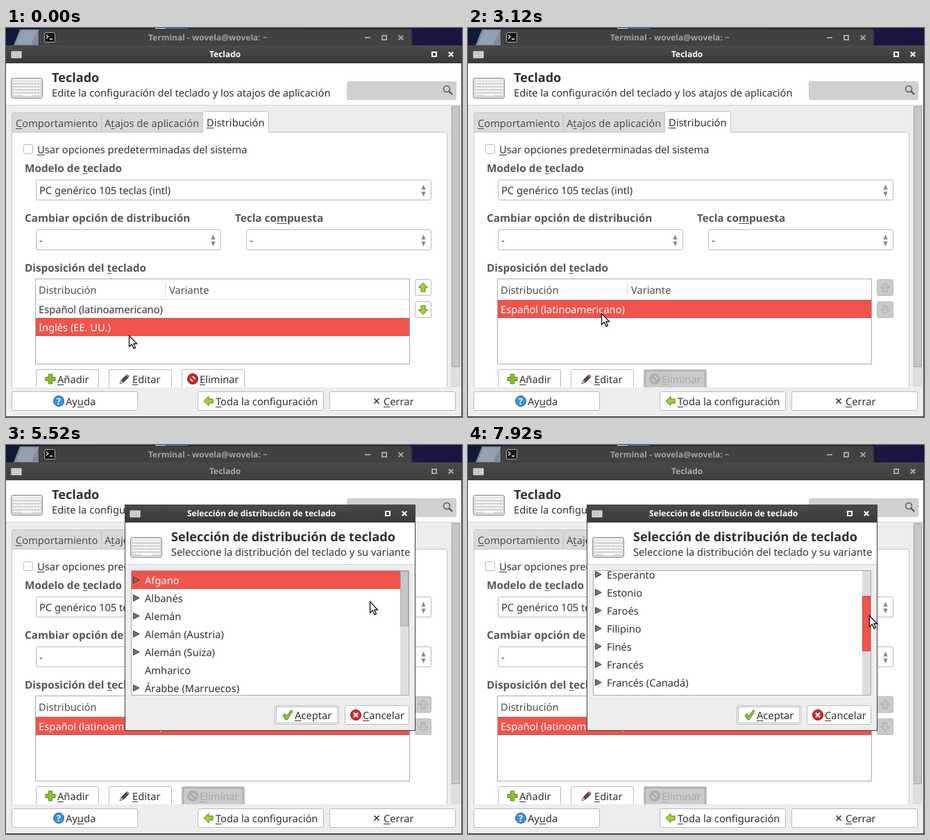
Animation, 657 px wide and 562 px high, one loop 8 s. Source, as an HTML page with a canvas:

```html
<!DOCTYPE html>
<html lang="es">
<head>
<meta charset="utf-8">
<style>
html, body { margin: 0; width: 100%; height: 100%; overflow: hidden; }
canvas { display: block; }
</style>
</head>
<body>
<canvas id="stage" width="657" height="562"></canvas>
<script>
const ctx = document.getElementById('stage').getContext('2d');
const LOOP = 8000, STEP = 120;
const INK = '#2f2f2f', SOFT = '#565656', RED = '#f0544c', BODY = '#ededed', EDGE = '#b9b9b9', OFF = '#a8a8a8';
const face = '"Noto Sans", "Open Sans", sans-serif';
const REG = '14.67px ' + face, LABEL = 'bold 15.3px ' + face;
const HEAD = 'bold 18.1px ' + face, TITLE = 'bold 12px ' + face;

// time, pointer x, pointer y, list scroll
const keys = [
  [0, 177, 444, 0], [840, 280, 505, 0], [1200, 280, 505, 0], [1800, 192, 412, 0],
  [3120, 192, 412, 0], [3240, 174, 400, 0], [3360, 147, 420, 0], [3480, 125, 446, 0],
  [3600, 125, 446, 0], [4200, 99, 506, 0], [4800, 99, 506, 0], [5160, 512, 231, 0],
  [5280, 512, 231, 0], [6120, 573, 207, 0], [6240, 573, 207, 0], [6480, 575, 211, 0],
  [6960, 579, 233, 448], [7680, 579, 245, 814], [7800, 579, 245, 814],
  [7920, 578, 246, 814], [8000, 578, 246, 814]
];

const layouts = ('Afgano,Albanés,Alemán,Alemán (Austria),Alemán (Suiza),Amharico,Árabbe (Marruecos),' +
  'Árabe,Árabe (Siria),Armenio,Azerbaiyano,Bambara,Bengalí,Bielorruso,Bosnio,Braille,Búlgaro,Burmese,' +
  'Cingalés (fonético),Coreano,Croata,Checo,Chino,Danés,Dhivehi,Dzongkha,Eslovaco,Esloveno,' +
  'Español,Español (latinoamericano),Esloveno (EE. UU.),Esperanto,Estonio,Faroés,Filipino,Finés,' +
  'Francés,Francés (Canadá)').split(',');
const leaves = ['Amharico', 'Burmese', 'Dhivehi', 'Dzongkha'];

function rect(x, y, w, h, color) {
  ctx.fillStyle = color;
  ctx.fillRect(x, y, w, h);
}

function box(x, y, w, h, fill = '#fff', line = EDGE, r = 2) {
  ctx.beginPath();
  ctx.roundRect(x + .5, y + .5, w - 1, h - 1, r);
  ctx.fillStyle = fill;
  ctx.fill();
  ctx.lineWidth = 1;
  ctx.strokeStyle = line;
  ctx.stroke();
}

// "_" marks the underlined access key
function text(s, x, y, color = INK, font = REG) {
  const at = s.indexOf('_'), plain = s.replace('_', '');
  ctx.font = font;
  ctx.fillStyle = color;
  ctx.fillText(plain, x, y);
  if (at < 0) return;
  const left = ctx.measureText(plain.slice(0, at)).width;
  ctx.fillRect(x + left, y + 2, ctx.measureText(plain[at]).width, 1);
}

function shape(x, y, d, fill, line, width = 1) {
  const path = new Path2D(d);
  ctx.save();
  ctx.translate(x, y);
  ctx.lineWidth = width;
  if (fill) { ctx.fillStyle = fill; ctx.fill(path); }
  if (line) { ctx.strokeStyle = line; ctx.stroke(path); }
  ctx.restore();
}

function disc(x, y, r, fill, line) {
  ctx.beginPath();
  ctx.arc(x, y, r, 0, 7);
  ctx.fillStyle = fill;
  ctx.fill();
  ctx.lineWidth = 1;
  ctx.strokeStyle = line;
  ctx.stroke();
}

const cross = (x, y, r, color, w = 2) =>
  shape(x, y, `M${-r} ${-r}L${r} ${r}M${r} ${-r}L${-r} ${r}`, null, color, w);

const square = (x, y, color) => shape(x, y, 'M-3-3H3V3H-3Z', null, color, 2);

function focusRing(x, y, w, h) {
  ctx.setLineDash([1, 1]);
  ctx.strokeStyle = '#777';
  ctx.lineWidth = 1;
  ctx.strokeRect(x + 2.5, y + 2.5, w - 5, h - 5);
  ctx.setLineDash([]);
}

function button(x, y, w, h, label, tx, { hot, focus, off } = {}) {
  box(x, y, w, h, off ? '#cacaca' : hot ? '#dcdcdc' : '#fff', off ? '#bcbcbc' : EDGE);
  if (focus) focusRing(x, y, w, h);
  text(label, tx, y + 20, off ? OFF : INK);
}

function arrow(x, y, turn, off) {
  ctx.save();
  ctx.translate(x, y);
  ctx.rotate(turn);
  shape(0, 0, 'M0-6.8L6.6 0H3V6H-3V0H-6.6Z', off ? '#c4c4c4' : '#a0d32f', off ? OFF : '#577f16');
  ctx.restore();
}

function keyboard(x, y) {
  box(x, y, 46, 30, '#d9dad7', '#8d8f8b', 3);
  rect(x + 2, y + 2, 42, 2, '#f2f2f0');
  for (let row = 0; row < 5; row++) {
    for (let col = 0; col < 10; col++) {
      if (row == 4 && col > 2 && col < 7) continue;
      rect(x + 4 + col * 4 - (row % 2) * .5, y + 5 + row * 4.4, 3, 3.2, '#fff');
      rect(x + 4 + col * 4 - (row % 2) * .5, y + 8 + row * 4.4, 3, .8, '#a5a7a3');
    }
  }
  rect(x + 16, y + 22.6, 15, 3.2, '#fff');
}

function keyboardSmall(x, y) {
  box(x, y, 16, 11, '#e3e3e1', '#8f918d', 1);
  for (let i = 0; i < 15; i++) rect(x + 2 + i % 5 * 2.5, y + 2 + (i / 5 | 0) * 2.7, 1.5, 1.5, '#999b97');
}

function titleBar(x, y, w, title, tx, active) {
  const g = ctx.createLinearGradient(0, y, 0, y + 26);
  g.addColorStop(0, active ? '#4a4a4a' : '#484848');
  g.addColorStop(1, active ? '#393939' : '#404040');
  rect(x, y, w, 26, g);
  const color = active ? '#fff' : '#aaa';
  keyboardSmall(x + 7, y + 8);
  text(title, tx, y + 17, color, TITLE);
  square(x + w - 40, y + 13, color);
  cross(x + w - 16, y + 13, 3.3, color);
}

function combo(x, y, w, value) {
  box(x, y, w, 30);
  text(value, x + 5, y + 21);
  shape(x + w - 11.5, y + 11, 'M0-3.5L3 3.5H-3Z', '#858585');
  shape(x + w - 11.5, y + 21, 'M0 3.5L3-3.5H-3Z', '#858585');
}

function selection(x, y, w) {
  rect(x, y, w, 26, RED);
  rect(x, y, w, 1, '#dd4a42');
  rect(x, y + 25, w, 1, '#dd4a42');
}

function desktop() {
  const g = ctx.createLinearGradient(0, 0, 657, 0);
  g.addColorStop(0, '#101a35');
  g.addColorStop(.5, '#17224c');
  g.addColorStop(1, '#1d1340');
  rect(0, 0, 657, 26, g);
  shape(0, 0, 'M20 2H48V25H11Z', '#7d8b9b');
  shape(0, 0, 'M22 4H46L36 24H14Z', '#94a1ae');
  rect(215, 0, 15, 1, '#e8eef5');
  rect(230, 0, 32, 1, '#2f87c9');
  box(47, 1, 538, 26, '#414141', '#333', 3);
  box(55, 6, 16, 15, '#161616', '#aaa', 2);
  shape(58, 10, 'M0 0L3 2.5L0 5M5 6H9', null, '#eee', 1.3);
  text('Terminal - wovela@wovela: ~', 205, 18, '#a2a2a2', TITLE);
  rect(517, 13, 8, 2, '#a2a2a2');
  square(545, 14, '#a2a2a2');
  cross(569, 14, 3.3, '#a2a2a2');
}

function header(x, y, w, title, sub) {
  rect(x, y, w, 60, '#fff');
  rect(x, y + 60, w, 1, '#d2d2d2');
  keyboard(x + 7, y + 21);
  text(title, x + 66, y + 27, INK, HEAD);
  text(sub, x + 66, y + 48);
}

function layoutTable(removed) {
  text('Disposición del _teclado', 27, 352, SOFT, LABEL);
  box(42, 362, 540, 124, '#fff', '#a9a9a9', 0);
  rect(43, 392, 538, 1, '#dcdcdc');
  rect(229, 367, 1, 22, '#dcdcdc');
  text('Distribución', 47, 384, '#4c4c4c');
  text('Variante', 235, 384, '#4c4c4c');
  selection(43, removed ? 393 : 419, 538);
  text('Español (latinoamericano)', 47, 412, removed ? '#fff' : INK);
  if (!removed) text('Inglés (EE. UU.)', 47, 438, '#fff');
  for (const [y, turn] of [[363, 0], [395, Math.PI]]) {
    box(589, y, 24, 24, removed ? '#cacaca' : '#fff', removed ? '#bcbcbc' : EDGE);
    arrow(601, y + 12, turn, removed);
  }
}

function editButtons(t, removed) {
  const adding = t >= 3960 && t < 4920;
  button(43, 493, 91, 30, '_Añadir', 74, { hot: adding, focus: adding && t >= 4200 });
  shape(64, 507, 'M-2.5-7H2.5V-2.5H7V2.5H2.5V7H-2.5V2.5H-7V-2.5H-2.5Z', '#86c32b', '#4e8a12');
  button(148, 493, 91, 30, '_Editar', 182);
  shape(171, 507, 'M-7 7L-5 2L3-6L6-3L-2 5Z', '#4b4f52', '#2c2e30');
  shape(171, 507, 'M2-5L4-7L7-4L5-2Z', '#d96c7b');
  shape(171, 507, 'M-7 7L-5 2L-2 5Z', '#e8c48b');
  button(253, 493, 91, 30, 'E_liminar'.replace('E_l', '_El'), 279,
    { hot: t >= 600, focus: t >= 840, off: removed });
  disc(269, 507, 7.5, removed ? '#b2b2b2' : '#cf2020', removed ? OFF : '#8f1212');
  disc(269, 507, 4.3, removed ? '#d2d2d2' : '#f3eeee', removed ? '#b2b2b2' : '#cf2020');
  shape(269, 507, 'M-4-4L4 4', null, removed ? '#a9a9a9' : '#cf2020', 3);
}

function settings(t) {
  const removed = t >= 960;
  rect(0, 51, 657, 511, BODY);
  titleBar(0, 25, 657, 'Teclado', 293, t < 4320);
  header(0, 51, 657, 'Teclado', 'Edite la configuración del teclado y los atajos de aplicación');
  box(491, 77, 158, 27, '#d0d0d0', '#cbcbcb');
  ctx.beginPath();
  ctx.arc(635, 88, 4.5, 0, 7);
  ctx.strokeStyle = '#555';
  ctx.lineWidth = 1.4;
  ctx.stroke();
  shape(638, 91, 'M0 0L5 5', null, '#555', 2.2);

  rect(641, 112, 14, 407, '#dedede');
  box(642, 113, 12, 377, '#c6c6c6', '#a6a6a6', 0);

  box(8, 122, 130, 32, '#d9d9d9', '#c3c3c3');
  box(137, 122, 148, 32, '#d9d9d9', '#c3c3c3');
  box(8, 150, 628, 390, '#fff', '#c3c3c3');
  box(283, 120, 96, 35, '#fff', '#c3c3c3');
  rect(280, 151, 102, 8, '#fff');
  text('_Comportamiento', 14, 143, '#4c4c4c');
  text('A_tajos de aplicación', 142, 143, '#4c4c4c');
  text('_Distribución', 289, 142);

  box(25, 168, 14, 14);
  text('_Usar opciones predeterminadas del sistema', 45, 181);
  text('Modelo de _teclado', 27, 208, SOFT, LABEL);
  combo(43, 219, 570, 'PC genérico 105 teclas (intl)');
  text('Cambiar opción de distribución', 27, 280, SOFT, LABEL);
  combo(43, 291, 267, '-');
  text('Tecla co_mpuesta', 330, 280, SOFT, LABEL);
  combo(346, 291, 267, '-');
  layoutTable(removed);
  editButtons(t, removed);

  rect(0, 519, 656, 42, BODY);
  button(8, 525, 182, 28, 'Ay_uda', 86);
  disc(76, 539, 7.5, '#3b8fe0', '#1a5fa8');
  text('?', 72.8, 544, '#fff', 'bold 13px ' + face);
  button(276, 525, 182, 28, '_Toda la configuración', 302);
  arrow(292, 539, -Math.PI / 2);
  button(466, 525, 182, 28, '_Cerrar', 544);
  cross(534, 539, 3.5, '#333', 1.7);
  rect(656, 51, 1, 511, '#3d3d3d');
  rect(0, 561, 657, 1, '#3d3d3d');
}

function picker(t, scroll) {
  rect(171, 86, 419, 327, '#3d3d3d');
  rect(172, 112, 417, 300, BODY);
  titleBar(171, 86, 419, 'Selección de distribución de teclado', 261, true);
  header(172, 112, 417, 'Selección de distribución de teclado',
    'Seleccione la distribución del teclado y su variante');

  box(180, 181, 401, 181, '#fff', '#a9a9a9', 0);
  ctx.save();
  ctx.beginPath();
  ctx.rect(181, 182, 399, 179);
  ctx.clip();
  layouts.forEach((name, i) => {
    const y = 182 + i * 26 - scroll;
    if (y < 156 || y > 361) return;
    if (i == 0) selection(181, y, 387);
    if (!leaves.includes(name)) shape(183.5, y + 13, 'M0-4.5L8.5 0L0 4.5Z', '#777', '#333');
    text(name, 200, y + 19, i ? INK : '#fff');
  });
  rect(568, 182, 12, 180, '#dedede');
  const drag = t >= 6360, over = t >= 6000;
  box(568, 182 + Math.round(scroll / 22.5), 12, 80, drag ? RED : over ? '#b4b4b4' : '#c6c6c6',
    drag ? '#d8473f' : '#a6a6a6', 0);
  ctx.restore();

  button(387, 376, 93, 28, '_Aceptar', 416, { focus: true });
  shape(406, 390, 'M-7 1L-4-2L-2 2L5-7L7-5L-1 7H-3Z', '#8cc63a', '#4d8312');
  button(488, 376, 93, 28, '_Cancelar', 514);
  disc(504, 390, 7.5, '#d42a2a', '#8f1212');
  cross(504, 390, 3, '#fff', 2.4);
}

function pose(t) {
  const i = keys.findIndex(k => k[0] > t);
  const a = keys[i - 1], b = keys[i];
  let u = (t - a[0]) / (b[0] - a[0]);
  if (t < 6300) u *= u * (3 - 2 * u);
  return a.map((v, n) => Math.round(v + (b[n] - v) * u));
}

function draw(now) {
  const t = Math.floor(now % LOOP / STEP) * STEP;
  const [, x, y, scroll] = pose(t);
  desktop();
  settings(t);
  if (t >= 4320) picker(t, scroll);
  shape(x + .5, y + .5, 'M0 0V16L3.7 12.6L6.5 18.6L9 17.5L6.3 11.6H11Z', '#fff', '#000', 1.2);
  requestAnimationFrame(draw);
}

ctx.textRendering = 'geometricPrecision';
const start = performance.now();
requestAnimationFrame(now => draw(Math.max(0, now - start)));
draw = (paint => now => paint(Math.max(0, now - start)))(draw);
</script>
</body>
</html>
```
